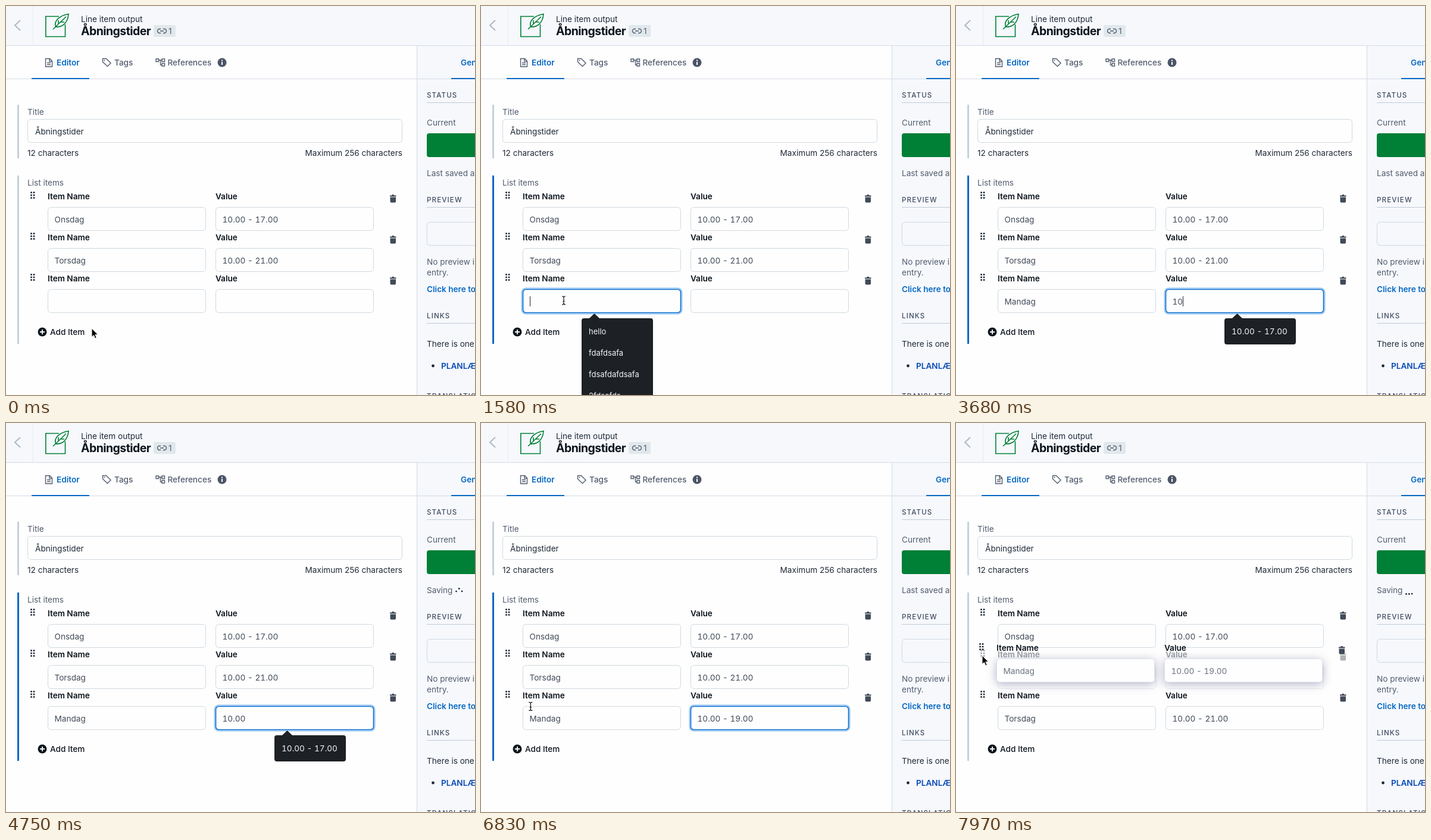
An HTML page that plays this animation: 788x654 px, repeating every 8000 ms.

```html
<!DOCTYPE html>
<html lang="en">
<head>
<meta charset="utf-8">
<title>List editor</title>
<style>
  html, body { margin: 0; width: 100%; height: 100%; overflow: hidden; background: #fefefe; }
  svg { display: block; width: 788px; height: 654px; font: 13.6px Inter, "Liberation Sans", sans-serif; fill: #1f2937; }
  .muted { fill: #525c6e; }
  .strong { font-weight: 600; fill: #0c141c; }
  .medium { font-weight: 500; fill: #525c6e; }
  .action { font-weight: 500; fill: #0c141c; }
  .link { font-weight: 600; fill: #0668c4; }
  .deep { font-weight: 600; fill: #0649b4; }
  .heading { font-size: 11.6px; font-weight: 500; letter-spacing: 1.1px; fill: #414d63; }
  .title { font-size: 19.4px; font-weight: 700; letter-spacing: -.5px; fill: #0c141c; }
  .entry { fill: #414a58; }
  .value, #valueMenu { font-variant-numeric: tabular-nums; }
  .menu { fill: #f4f6f8; }
  #nameMenu { font-size: 13px; }
  .box { fill: #fefefe; stroke: #cfd9e0; }
  .rule { fill: #d3dce4; }
  .icon { fill: none; stroke: #525c6e; stroke-width: 1.4; }
  #clone .box { filter: drop-shadow(0 3px 8px rgba(50, 55, 110, .38)); stroke: #dfe3ec; }
  #clone .entry { fill: #6a7180; }
</style>
</head>
<body>
<svg id="stage" viewBox="0 0 788 654"></svg>
<script>
const BLUE = '#0668c4', PANEL = '#f6f8fc', GREEN = '#007f36', GRAY = '#c6d0d8', DARK = '#1d2125';

const text = (x, y, s, cls = '', extra = '') => `<text x="${x}" y="${y}" class="${cls}" ${extra}>${s}</text>`;
const rect = (x, y, w, h, attrs = '') => `<rect x="${x}" y="${y}" width="${w}" height="${h}" ${attrs}/>`;
const path = (d, attrs = 'class="icon"') => `<path d="${d}" ${attrs}/>`;
const circle = (x, y, r, attrs = '') => `<circle cx="${x}" cy="${y}" r="${r}" ${attrs}/>`;
const box = (x, y, w, extra = '') => rect(x + .5, y + .5, w - 1, 39, `rx="5" class="box" ${extra}`);
const group = (id, content) => `<g id="${id}">${content}</g>`;

const trash = path('M645 318.5h3l1-1.5h2.500l1 1.500h3v2h-10.500zM645.500 321.500h9.500v7q0 2-2 2h-5.500q-2 0-2-2z', 'fill="#414a58"');
const grip = [0, 1, 2].map(i => circle(42.5, 313.5 + i * 4.5, 1.5) + circle(47, 313.5 + i * 4.5, 1.5)).join('');

const row = (id, name, value) => group(id,
  grip + trash +
  text(70, 325, 'Item Name', 'strong') + text(352, 325, 'Value', 'strong') +
  box(70, 338, 266) + box(352, 338, 266) +
  text(81.5, 364, name, 'entry name') + text(363.5, 364, value, 'entry value'));

const header =
  rect(0, 0, 788, 66, `fill="${PANEL}"`) + rect(0, 66, 788, 1, 'class="rule"') + rect(45, 0, 1, 66, 'fill="#e5ebf0"') +
  path('M24 24L15 32.500L24 41', 'fill="none" stroke="#aeb8c2" stroke-width="2"') +
  path('M89 17.500H66.800V51.500H99.500V31M79 39L101 18M83.500 35C80 25 90 16 105 13.500C104 28 95 36 83.500 35M88 30V24M91 27H98',
    `fill="none" stroke="${GREEN}" stroke-width="1.6"`) +
  text(126, 27, 'Line item output') + text(126, 49, 'Åbningstider', 'title') +
  rect(248, 32, 37, 20, 'rx="3" fill="#e1e8ec"') +
  path('M260 38.500h-2a3.500 3.500 0 0 0 0 7h2M264 38.500h2a3.500 3.500 0 0 1 0 7h-2M259 42h6') +
  text(273, 47, '1', 'muted');

const tabs =
  rect(0, 122, 690, 1, 'class="rule"') + rect(43, 121, 97, 2, `fill="${BLUE}"`) +
  path('M66.500 88.500h7l4 4v9.500h-11zM73 89v4h4M69 95.500h6M69 98.500h6') + text(85, 100, 'Editor', 'link') +
  path('M162.500 88.500h6l7.500 7.500-5.500 5.500-8-7.500z') + circle(165.500, 91.500, 1, 'fill="#525c6e"') + text(182, 100, 'Tags', 'medium') +
  path('M252 89h4.500v4.500h-4.500zM262 89h4.500v4.500h-4.500zM262 96.500h4.500v4.500h-4.500zM257 91h5M259.500 91v8h2.500') +
  text(271.500, 100, 'References', 'medium') + circle(363, 95, 7.5, 'fill="#4b5566"') +
  path('M363 90.500v2M363 94v5', 'stroke="#fff" stroke-width="2"');

const fields =
  rect(19, 166, 3, 90, `fill="${GRAY}"`) + text(36, 183, 'Title', 'muted') + box(36, 190, 630) +
  text(49, 216, 'Åbningstider') + text(36, 252, '12 characters') +
  text(666, 252, 'Maximum 256 characters', '', 'text-anchor="end"') +
  rect(19, 285, 3, 283, 'id="bar"') + text(36, 302, 'List items', 'muted') +
  circle(61, 548, 7.5, 'fill="#0c141c"') + path('M57 548h8M61 544v8', 'stroke="#fff" stroke-width="1.8"') +
  text(74, 553, 'Add Item', 'action');

const section = (y, name) => text(707, y, name, 'heading') + rect(707, y + 8, 81, 1, 'fill="#bfcad6"');
const panel =
  rect(690, 67, 98, 587, `fill="${PANEL}"`) + rect(690, 67, 1, 587, 'class="rule"') +
  rect(691, 122, 97, 1, 'class="rule"') + rect(748, 121, 40, 2, `fill="${BLUE}"`) +
  text(764, 100, 'General', 'link') + section(154, 'STATUS') + text(707, 201, 'Current', 'muted') +
  rect(707, 214, 90, 40, `rx="4" fill="${GREEN}"`) +
  text(707, 286, 'Last saved at', 'muted', 'id="saved"') +
  group('saving', text(707, 286, 'Saving', 'muted') + [0, 1, 2].map(i => circle(756.5 + i * 4.8, 287.5, 1.4, 'class="dot"')).join('')) +
  section(330, 'PREVIEW') + box(707, 363, 100, `style="fill:${PANEL}"`) +
  text(707, 435, 'No preview is', 'muted') + text(707, 453, 'entry.', 'muted') + text(707, 481, 'Click here to', 'link') +
  section(525, 'LINKS') + text(707, 573, 'There is one') + circle(717.5, 605, 2.4) + text(731, 610, 'PLANLÆG', 'deep') +
  text(707, 660, 'TRANSLATIONS', 'heading');

const focusRing = group('focus',
  rect(69.500, 475.500, 267, 41, 'rx="6" fill="none" stroke="#98c6f5" stroke-width="4"') +
  rect(70.500, 476.500, 265, 39, `rx="5" fill="none" stroke="${BLUE}" stroke-width="1.2"`));

const nameMenu = group('nameMenu',
  path('M169 654V529q0-4 4-4h9l8.500-8 8.500 8h86q4 0 4 4v125z', `fill="${DARK}"`) +
  ['hello', 'fdafdsafa', 'fdsafdafdsafa', '2fdsafds'].map((s, i) => text(181, 552 + i * 36, s, 'menu')).join(''));
const valueMenu = group('valueMenu',
  path('M455 525h9l8.500-8 8.500 8h86q4 0 4 4v36q0 4-4 4h-112q-4 0-4-4v-36q0-4 4-4z', `fill="${DARK}"`) +
  text(463, 552, '10.00 - 17.00', 'menu'));

const pointer =
  path('M0 0V14.500L3.400 11.500L5.800 17L8.200 16L5.900 10.600H10.500Z', 'id="arrow" fill="#000" stroke="#fff" stroke-width="1"') +
  path('M-3-7q3 0 3 2q0-2 3-2M0-5V5M-3 7q3 0 3-2q0 2 3 2M-1.500 1.500h3', 'id="beam" fill="none" stroke="#111" stroke-width="1.2"');

document.getElementById('stage').innerHTML = header + tabs + fields +
  row('first', 'Onsdag', '10.00 - 17.00') + row('second', 'Torsdag', '10.00 - 21.00') +
  row('third', '', '') + row('clone', 'Mandag', '10.00 - 19.00') +
  focusRing + rect(0, 488, 1, 17, 'id="caret"') + nameMenu + valueMenu + panel + pointer;

const el = id => document.getElementById(id);
const show = (id, on) => el(id).style.display = on ? '' : 'none';
const move = (id, x, y) => el(id).setAttribute('transform', `translate(${x} ${y})`);
const clamp = v => Math.min(1, Math.max(0, v));
const ease = v => v * v * (3 - 2 * v);

// Keys are [time, x, y].
function along(keys, t) {
  const i = keys.findIndex(k => k[0] > t);
  if (i < 0) return keys.at(-1).slice(1);
  if (i === 0) return keys[0].slice(1);
  const a = keys[i - 1], b = keys[i], u = ease((t - a[0]) / (b[0] - a[0]));
  return [a[1] + (b[1] - a[1]) * u, a[2] + (b[2] - a[2]) * u];
}

const LOOP = 8000, FOCUS_NAME = 1200, FOCUS_VALUE = 3200, BLUR = 7350, DRAG = 7440, SWAP = 7750;
const nameKeys = [1850, 2040, 2220, 2400, 2560, 2740];
const valueKeys = [3500, 3640, 3800, 3980, 4150, 4900, 5050, 5200, 5360, 5500, 5640, 5760, 5880];
const pointerKeys = [[500, 144, 542], [1000, 139, 495], [6350, 139, 495], [7200, 46, 464], [7400, 46, 464], [7500, 46, 458], [7970, 44, 391]];
const dragKeys = [[7400, 0, 138], [7500, 0, 131.5], [7970, -2, 58]];
const savingSpans = [[4500, 5500], [7475, LOOP]];
const typed = (s, keys, t) => s.slice(0, keys.filter(k => k <= t).length);

function draw(t) {
  const name = typed('Mandag', nameKeys, t), value = typed('10.00 - 19.00', valueKeys, t);
  const nameText = document.querySelector('#third .name'), valueText = document.querySelector('#third .value');
  nameText.textContent = name;
  valueText.textContent = value;

  const focused = t >= FOCUS_NAME && t < BLUR, onValue = t >= FOCUS_VALUE;
  el('bar').setAttribute('fill', focused ? BLUE : GRAY);
  show('focus', focused);
  move('focus', onValue ? 282 : 0, 0);
  const lastInput = Math.max(...[FOCUS_NAME, FOCUS_VALUE, ...nameKeys, ...valueKeys].filter(k => k <= t));
  show('caret', focused && (t - lastInput) % 1060 < 530);
  const active = onValue ? valueText : nameText;
  el('caret').setAttribute('x', Math.round((onValue ? 363.5 : 81.5) + active.getComputedTextLength()));
  show('nameMenu', focused && t < nameKeys[0]);
  show('valueMenu', t >= valueKeys[0] && t < valueKeys[9]);

  const dragging = t >= DRAG;
  move('second', 0, 69 + 69 * ease(clamp((t - SWAP) / 140)));
  move('third', 0, t < SWAP ? 138 : 69);
  el('third').style.opacity = dragging ? .42 : 1;
  show('clone', dragging);
  move('clone', ...along(dragKeys, t));
  el('clone').style.opacity = clamp((t - DRAG) / 160);

  const span = savingSpans.find(([from, to]) => t >= from && t < to);
  show('saved', !span);
  show('saving', span);
  if (span) document.querySelectorAll('.dot').forEach((dot, i) => {
    const phase = clamp(((t - span[0]) % 600 - i * 100) / 300);
    dot.setAttribute('cy', 287.5 - 9 * Math.sin(phase * Math.PI));
  });

  const [x, y] = along(pointerKeys, t);
  const visible = t < nameKeys[0] || t >= 6350;
  const overInput = x > 70 && y > 476 && y < 516;
  show('arrow', visible && !overInput);
  show('beam', visible && overInput);
  move('arrow', x, y);
  move('beam', x, y);
}

const start = performance.now();
function frame() {
  draw((performance.now() - start) % LOOP);
  requestAnimationFrame(frame);
}
frame();
</script>
</body>
</html>
```
